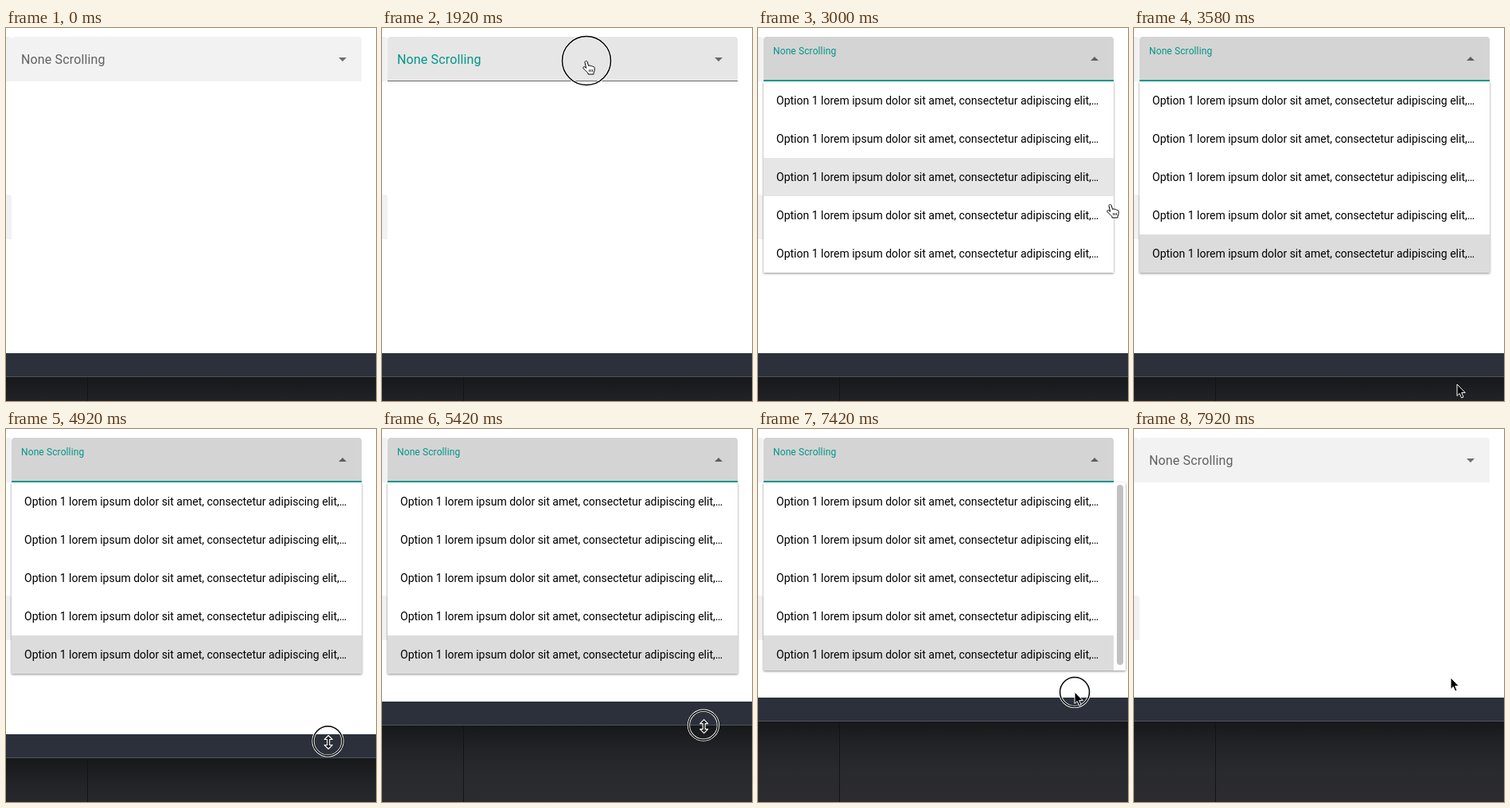
These frames come from a looping animation (465 by 468 pixels, 8 s). An HTML page:

```html
<!DOCTYPE html>
<html lang="en">
<head>
<meta charset="utf-8">
<title>Select menu</title>
<style>
  html, body { margin: 0; width: 100%; height: 100%; overflow: hidden; background: #fff; }
  svg { display: block; }
  text { font-family: Roboto, sans-serif; }
  #label { font-size: 16px; letter-spacing: .15px; }
  #rows text { font-size: 14px; }
  #menu { filter: drop-shadow(0 1px 1.5px rgba(0, 0, 0, .45)); }
  #cursor path { stroke-linejoin: round; }
</style>
</head>
<body>
<svg width="465" height="468" viewBox="0 0 465 468">
  <defs>
    <linearGradient id="shade" x1="0" y1="0" x2="0" y2="1">
      <stop offset="0" stop-color="#17181a"/>
      <stop offset=".3" stop-color="#222326"/>
      <stop offset=".6" stop-color="#292a2d"/>
      <stop offset="1" stop-color="#2c2c30"/>
    </linearGradient>
  </defs>

  <path d="M0 11H3Q7 11 7 15V67H0ZM0 209H3Q7 209 7 213V265H0Z" fill="#f2f2f2"/>

  <g id="menu">
    <svg id="sheet" x="7" y="67" width="455" height="240">
      <rect id="paper" width="440" height="240" fill="#fff"/>
      <g id="rows"></g>
      <rect id="thumb" x="444" y="3" width="8" height="226" rx="4" fill="#c1c1c1"/>
    </svg>
  </g>

  <path id="field" d="M7 67V15Q7 11 11 11H443Q447 11 447 15V67Z"/>
  <rect id="underline" x="7" y="66" width="440" height="1" fill="#6b6b6b"/>
  <rect id="accent" y="65" height="2" fill="#009688"/>
  <text id="label">None Scrolling</text>
  <path id="caret" d="M418 37H428L423 42Z" fill-opacity=".54"/>

  <g id="panel">
    <rect width="465" height="29" fill="#2b303b"/>
    <rect y="30" width="465" height="102" fill="url(#shade)"/>
    <rect y="29" width="465" height="1" fill="#50555b"/>
    <rect x="102" y="30" width="1" height="102" fill="#121315"/>
  </g>

  <g id="cursor">
    <g id="ring" fill="none">
      <circle stroke="#fff" stroke-width="3.2"/>
      <circle stroke="#000" stroke-width="1.5"/>
    </g>
    <g id="hand" fill="#fff" stroke="#000">
      <path d="M-2 2.2C-2 0 .8-.2 1.3 2L2.6 6.6C3.5 5.6 5 5.8 5.4 7 6.3 6.2 7.6 6.6 8 7.6 9.2 7.2 10.2 8 10.2 9.5L10 12.5 9 15.5V17H2V15.5C0 13.5-2.5 11.5-4 9.6-4.8 8-3 7-1.8 8L-.4 9.4Z"/>
      <path d="M3.5 11V14M5.5 11V14M7.5 11V14" stroke-width=".8"/>
    </g>
    <path id="arrow" d="M0 0V14.5L3.2 11.5 5.6 17 8 16 5.7 10.6H10.3Z" stroke="#fff"/>
    <path id="resize" d="M.7-7 5.7-2H2.2V5H5.7L.7 10-4.3 5H-.8V-2H-4.3Z" fill="#1c1d20" stroke="#fff" stroke-width="1.1"/>
  </g>
</svg>

<script>
const TICKS_PER_SECOND = 12, LOOP = 8000;
const $ = id => document.getElementById(id);
const set = (id, attrs) => {
  for (const name in attrs) $(id).setAttribute(name, attrs[name]);
};
const show = (id, visible) => set(id, { visibility: visible ? 'visible' : 'hidden' });
const clamp = (v, lo = 0, hi = 1) => Math.min(hi, Math.max(lo, v));
const ramp = (tick, from, to) => clamp((tick - from) / (to - from));
const mix = (a, b, k) => a + (b - a) * k;

// Keys are [tick, value, ...], joined by straight lines.
function sample(keys, tick, column = 1) {
  const next = keys.findIndex(key => key[0] > tick);
  if (next < 0) return keys[keys.length - 1][column];
  if (next === 0) return keys[0][column];
  const a = keys[next - 1], b = keys[next];
  return mix(a[column], b[column], ramp(tick, a[0], b[0]));
}

const pointer = [
  [11, 330, 2], [14, 280, 30], [17, 260, 39], [19, 257, 41], [24, 257, 41],
  [30, 330, 75], [32, 360, 88], [33, 375, 100], [36, 443, 221], [38, 451, 320],
  [40, 430, 410], [42, 408, 444], [43, 406, 447], [46, 405, 449], [52, 405, 434],
  [53, 405, 439], [55, 405, 439], [56, 405, 436], [57, 405, 424], [58, 405, 408],
  [59, 404.5, 391.5], [60, 404.5, 380], [61, 404.5, 373.5], [62, 404.5, 373.5],
  [70, 403, 368.5], [84, 403, 368.5], [89, 398, 330], [94, 398, 327], [95, 398, 312]
];
const panelTop = [
  [56, 408], [57, 406], [58, 397], [59, 383], [60, 362], [61, 345], [62, 345], [70, 337]
];
const PRESS = 19, RELEASE = 23, GRAB = 54, DROP = 81, DISMISS = 91;

for (let i = 0; i < 5; i++) {
  $('rows').innerHTML += `<rect y="${i * 48}" width="440" height="48" fill="none"/>
    <text x="16" y="${i * 48 + 29}">Option 1 lorem ipsum dolor sit amet, consectetur adipiscing elit,…</text>`;
}
const rowRects = document.querySelectorAll('#rows rect');

function drawField(tick, y) {
  const open = ramp(tick, 23.8, 25.8) - ramp(tick, DISMISS, DISMISS + 2);
  const focused = tick >= PRESS && tick < DISMISS;
  const hovered = tick >= 11 && tick < RELEASE + 1 && y >= 11;
  const base = !hovered ? 242 : focused ? 230 : 236;
  const grey = Math.round(mix(base, 212, open));
  set('field', { fill: `rgb(${grey},${grey},${grey})` });
  show('underline', hovered);
  const half = 220 * ramp(tick, 23.8, 26);
  set('accent', { x: 227 - half, width: 2 * half, opacity: open });
  set('label', {
    fill: focused ? '#009688' : '#616161',
    transform: `translate(19 ${mix(45, 33, open)}) scale(${mix(1, .75, open)})`
  });
  set('caret', { transform: `rotate(${180 * open} 423 39)` });
}

function drawMenu(tick, top) {
  const grow = ramp(tick, 23.5, 25);
  const opacity = grow * (1 - ramp(tick, DISMISS, DISMISS + 1.5));
  const height = Math.min(240, top - 101);
  const scrolls = height < 240;
  set('menu', {
    opacity,
    transform: `translate(7 67) scale(1 ${mix(.8, 1, grow)}) translate(-7 -67)`,
    display: opacity ? 'inline' : 'none'
  });
  set('sheet', { height });
  set('paper', { width: scrolls ? 455 : 440 });
  set('thumb', { display: scrolls ? 'inline' : 'none' });

  // The highlight trails the pointer by one tick and stays on the last row.
  const active = Math.min(4, Math.floor((sample(pointer, tick - 1, 2) - 67) / 48));
  rowRects.forEach((rect, i) =>
    rect.setAttribute('fill', i !== active ? 'none' : tick < 38 ? '#e6e6e6' : '#dcdcdc'));
}

function drawCursor(tick, x, y) {
  const visible = tick >= 11;
  const resizing = tick >= 53 && tick < 85;
  const pointing = tick < 53 && y >= 11 && y <= 307;
  set('cursor', { transform: `translate(${x} ${y})` });
  show('resize', visible && resizing);
  show('hand', visible && pointing);
  show('arrow', visible && !resizing && !pointing);

  const released = tick === RELEASE || tick === DISMISS;
  const held = [[PRESS, RELEASE], [GRAB, DROP], [89, DISMISS]]
    .some(([from, to]) => tick >= from && tick < to);
  show('ring', held || released);
  for (const circle of $('ring').children) circle.setAttribute('r', released ? 30.5 : 18.5);
}

function draw(now) {
  const tick = Math.floor((now % LOOP + 5) * TICKS_PER_SECOND / 1000) % 96;
  const x = sample(pointer, tick), y = sample(pointer, tick, 2);
  const top = sample(panelTop, tick);
  drawField(tick, y);
  drawMenu(tick, top);
  set('panel', { transform: `translate(0 ${Math.round(top)})` });
  drawCursor(tick, x, y);
  requestAnimationFrame(() => draw(performance.now() - start));
}
const start = performance.now();
draw(0);
</script>
</body>
</html>
```
